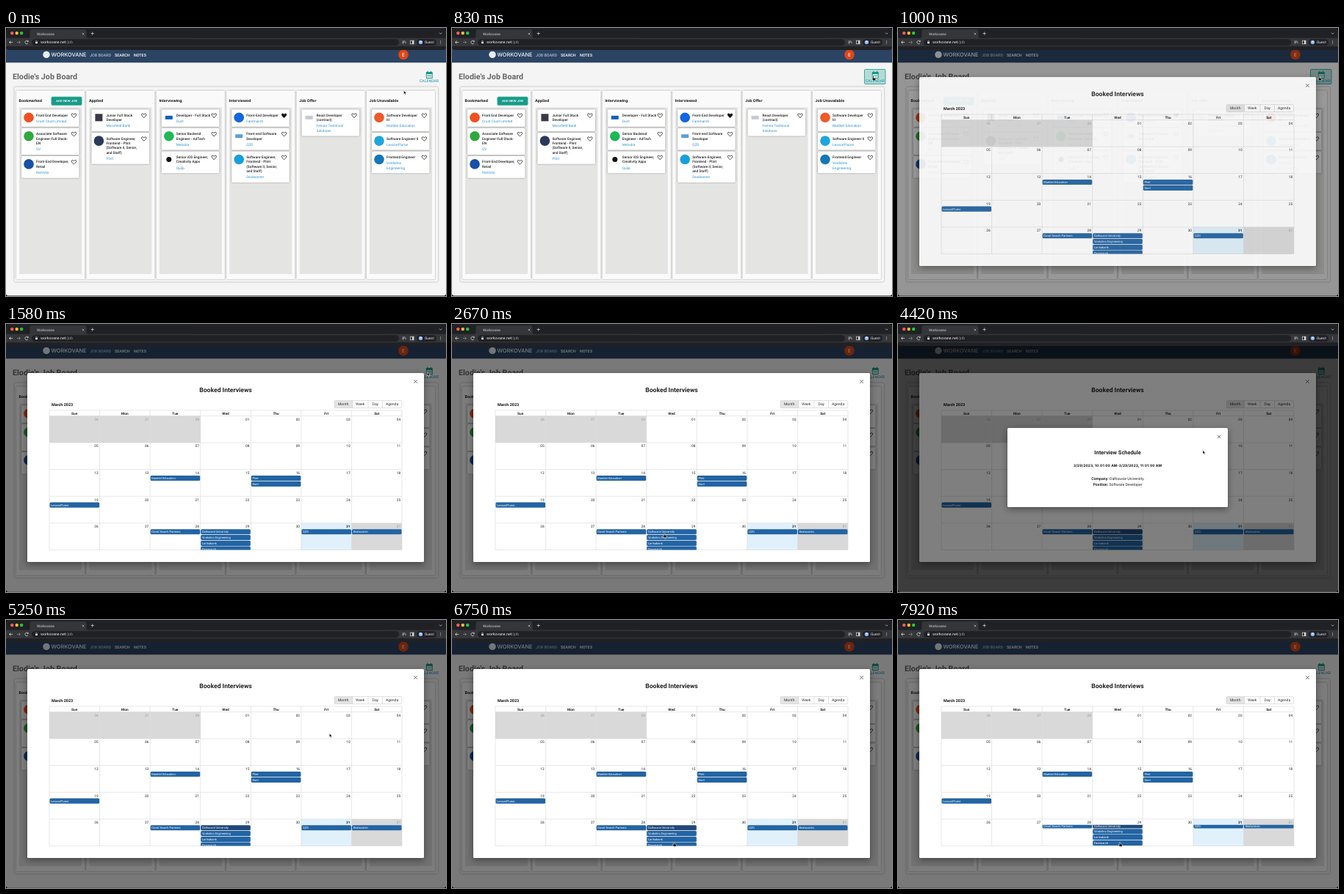
An HTML page for the animation above (8000 ms loop, 599 by 366 pixels).

```html
<!DOCTYPE html>
<html lang="en">
<head>
<meta charset="utf-8">
<title>Job board</title>
<style>
  html, body { margin: 0; width: 100%; height: 100%; overflow: hidden; background: #111; }
  svg { display: block; width: 100%; height: 100%; font-family: Roboto, sans-serif; text-rendering: geometricPrecision; }
  .wide { font-family: Inter, sans-serif; }
  .lift { filter: drop-shadow(0 .6px .8px rgba(0, 0, 0, .35)); }
  .dialog { filter: drop-shadow(0 3px 5px rgba(0, 0, 0, .4)); }
</style>
</head>
<body>
<svg id="stage" viewBox="0 0 599 366"></svg>
<script>
const LOOP = 8000, STEP = 1000 / 12;

// Markup helpers; text is placed by the middle of its capitals.
const rect = (x, y, w, h, fill, more = '') =>
  `<rect x="${x}" y="${y}" width="${w}" height="${h}" fill="${fill}" ${more}/>`;
const circle = (x, y, r, fill) => `<circle cx="${x}" cy="${y}" r="${r}" fill="${fill}"/>`;
const path = (d, stroke, width = .7, more = '') =>
  `<path d="${d}" fill="none" stroke="${stroke}" stroke-width="${width}" ${more}/>`;
const text = (x, y, size, label, fill = '#222', weight = 400, more = '') =>
  `<text x="${x}" y="${y + size * .36}" font-size="${size}" fill="${fill}" font-weight="${weight}" ${more}>${label}</text>`;
const middle = 'text-anchor="middle"';
const cross = (x, y, r, color, width = .8) =>
  path(`M${x - r} ${y - r}l${2 * r} ${2 * r}m0 ${-2 * r}l${-2 * r} ${2 * r}`, color, width);

function browserBar() {
  const light = '#d5d6d8';
  return rect(0, 0, 599, 30, '#202124', 'rx="4"') +
    ['#ff5f57', '#febc2e', '#28c840'].map((c, i) => circle(8.2 + i * 6.5, 7, 2.2, c)).join('') +
    '<path d="M30 14q2.5 0 2.5-2.500v-7q0-2.500 2.500-2.500h72q2.500 0 2.500 2.500v7q0 2.500 2.500 2.500z" fill="#35363a"/>' +
    rect(0, 13.7, 599, 11.5, '#35363a') +
    text(42, 8, 4.8, 'Workovane', light) + cross(105, 8, 1.3, light, .6) +
    path('M115.500 7.500h4.400m-2.200-2.200v4.400', light, .7) +
    path('M590 6.500l1.700 1.700l1.700-1.700', light, .7) +
    path('M9 19.500h-4.500m2-2l-2 2l2 2', light, .8) +
    path('M15 19.500h4.500m-2-2l2 2l-2 2', '#85878a', .8) +
    path('M30 18.300a2.200 2.200 0 1 0 .1 2.200m.1-3.500v1.600h-1.600', light, .8) +
    rect(35, 15.200, 500, 8.800, '#202124', 'rx="4.400"') +
    rect(40, 18.8, 3, 2.4, light) + path('M40.700 19v-1a.8.8 0 0 1 1.600 0v1', light, .5) +
    `<text x="47" y="21.400" font-size="5.300" fill="#eee">workovane.net<tspan fill="#96999d">/job</tspan></text>` +
    path('M539.500 18h4m-4 1.500h3m-3 1.500h2m2.500-2.500v2.500', light, .7) +
    rect(550.5, 17.2, 4.6, 4.6, 'none', `stroke="${light}" stroke-width=".7"`) + rect(553, 17, 2, 4.8, light) +
    rect(559, 15.300, 27, 8.600, '#202124', 'rx="4.300"') + circle(564.5, 19.5, 2.7, '#8ab4f8') +
    circle(564.5, 18.8, .9, '#fff') + text(570, 19.5, 4.9, 'Guest', '#eee') +
    [17.7, 19.5, 21.3].map(y => circle(591.7, y, .5, light)).join('');
}

// Each card: title lines, company lines, colour, mark shape, liked.
const COLUMNS = [
  ['Bookmarked', [
    ['Front End Developer', 'Crust Crust Limited', '#f0501f'],
    ['Associate Software|Engineer-Full Stack-|EN', 'QV', '#2fa83c'],
    ['Front-End Developer,|Retail', 'theVolio', '#1650a8']]],
  ['Applied', [
    ['Junior Full Stack|Developer', 'Mossfield Bank', '#3a3a46', 'square'],
    ['Software Engineer,|Frontend - Plint|(Software II, Senior,|and Staff)', 'Plint', '#2b3a5a']]],
  ['Interviewing', [
    ['Developer - Full Stack', 'Dunt', '#0b62b8', 'flat'],
    ['Senior Backend|Engineer - AdTech', 'Melodra', '#1db954'],
    ['Senior iOS Engineer,|Creativity Apps', 'Quilp', '#111', 'small']]],
  ['Interviewed', [
    ['Front-End Developer', 'Faremarsh', '#1266df', '', true],
    ['Front-end Software|Developer', 'QZD', '#5a9fdc', 'flat'],
    ['Software Engineer,|Frontend - Plint|(Software II, Senior,|and Staff)', 'Dealwarren', '#16a0e0']]],
  ['Job Offer', [
    ['React Developer|(contract)', 'Fennor Technical|Solutions', '#c4cbd0', 'flat']]],
  ['Job Unavailable', [
    ['Software Developer|III', 'Marblet Education', '#ee5a28'],
    ['Software Engineer II', 'LessonPlume', '#1fa5dd'],
    ['Frontend Engineer', 'Vordalino|Engineering', '#1477b6']]],
];

function mark(x, y, color, shape) {
  if (shape === 'flat') return rect(x - 5, y - 2.5, 10, 5, color);
  if (shape === 'square') return rect(x - 5, y - 5, 10, 10, color);
  return circle(x, y, shape === 'small' ? 3.5 : 6.8, color);
}

function card(x, y, [title, company, color, shape, liked]) {
  let at = y, words = '';
  title.split('|').forEach((line, i) => {
    at = y + i * 6.4;
    words += text(x + 27, at, 4.8, line, '#222', 500);
  });
  at += 8.2;
  company.split('|').forEach((line, i) => {
    at += i * 6.4;
    words += text(x + 27, at, 4.8, line, '#2a93d1');
  });
  const heart = path(`M${x + 78.4} ${y + 3.4}c-5.500-4-2.800-7.200 0-4.300c2.800-2.900 5.500 .3 0 4.300z`,
    '#111', .8, liked ? 'style="fill:#111"' : '');
  const body = rect(x + 7, y - 7.7, 78.5, at - y + 15.2, '#fff', 'rx="1.500" class="lift"');
  return [body + mark(x + 17, y + 3.3, color, shape) + words + heart, at + 17.2];
}

function column([name, cards], i) {
  const x = 14 + i * 95.4;
  let y = 119, out = rect(x, 85.5, 93, 257.5, '#fafafa', 'class="lift"') +
    rect(x + 4, 108.5, 85, 227.5, '#e4e4e3') + text(x + 3.6, 99, 5.1, name, '#111', 700, 'class="wide"');
  for (const data of cards) {
    const [markup, next] = card(x, y, data);
    out += markup;
    y = next;
  }
  return out;
}

function page() {
  return rect(0, 25, 599, 340.5, '#f4f4f4', 'rx="3"') + rect(0, 25, 599, 22.3, '#2c4463') +
    circle(55, 36.4, 4.7, '#e8edf2') + text(61.5, 36.6, 7.4, 'WORKOVANE', '#f0f3f6', 500, 'class="wide"') +
    text(114, 36.6, 5.4, 'JOB BOARD', '#a9bccf', 500) + text(148, 36.6, 5.4, 'SEARCH', '#fff', 500) +
    text(174, 36.6, 5.4, 'NOTES', '#fff', 500) +
    circle(541, 36.4, 6.8, '#dd4719') + text(541, 36.4, 7, 'E', '#fff', 400, middle) +
    text(9, 66.5, 10.7, 'Elodie\'s Job Board', '#666', 700) +
    rect(561.5, 56.5, 28.5, 20, '#179a8b', 'id="hover" fill-opacity=".28" stroke="#179a8b" stroke-width=".8" rx="1"') +
    rect(571.8, 60, 9, 9, '#149888', 'rx="1"') + rect(572.8, 63, 7, 5, '#f4f4f4') +
    rect(573.5, 58.8, 1.1, 2, '#149888') + rect(578, 58.8, 1.1, 2, '#149888') +
    [574, 576, 578].map(x => rect(x - .1, 64, .9, 2.6, '#149888')).join('') +
    text(576, 72.4, 5.2, 'CALENDAR', '#1b8fae', 400, middle) +
    rect(11.5, 80.5, 576.5, 266, '#f6f6f6', 'rx="2" class="lift"') +
    COLUMNS.map(column).join('') +
    rect(61.8, 94, 41.4, 11.5, '#159b87', 'rx="1.500" stroke="#5cbcae" stroke-width=".8"') +
    text(82.5, 99.8, 4.1, 'ADD NEW JOB', '#fff', 600, middle + ' class="wide"');
}

const GRID = { x: 59, y: 125.5, w: 480 / 7, h: 36.6 };
// Events: column, row, slot in the day, label, id.
const EVENTS = [
  [2, 2, 0, 'Marblet Education'], [4, 2, 0, 'Plint'], [4, 2, 1, 'Dunt'], [0, 3, 0, 'LessonPlume'],
  [2, 4, 0, 'Dovel Search Partners'], [3, 4, 0, 'Dalhousie University', 'picked'],
  [3, 4, 1, 'Vordalino Engineering'], [3, 4, 2, 'Lorinabank'], [3, 4, 3, 'Faremarsh'],
  [5, 4, 0, 'QZD'], [6, 4, 0, 'Dealwarren', 'late'],
];

function event([col, row, slot, label, id]) {
  const x = GRID.x + col * GRID.w, y = GRID.y + row * GRID.h + 8.3 + slot * 7.8;
  return `<g ${id ? `id="${id}"` : ''} fill="#2364a3">` +
    `<rect x="${x + .5}" y="${y}" width="${GRID.w - 1}" height="7.100" rx="1.500"/>` +
    text(x + 2.2, y + 3.6, 4, label, '#fff') + '</g>';
}

function calendar() {
  const { x, y, w, h } = GRID, line = '#d8d8d8';
  let cells = '';
  for (let i = 0; i < 35; i++) {
    const col = i % 7, row = Math.floor(i / 7), off = i < 3 || i === 34, today = i === 33;
    const day = i < 3 ? 26 + i : i === 34 ? 1 : i - 2;
    if (off || today) cells += rect(x + col * w, y + row * h, w, h, off ? '#d9d9d9' : '#e0f1fc');
    cells += text(x + (col + 1) * w - 1.8, y + row * h + 4.6, 4.8, String(day).padStart(2, '0'),
      off ? '#999' : '#222', today ? 700 : 400, 'text-anchor="end"');
  }
  let lines = '';
  for (let i = 1; i < 7; i++) lines += `M${x + i * w} 118v${y + 5 * h - 118}`;
  for (let i = 0; i < 5; i++) lines += `M${x} ${y + i * h}h480`;
  const days = ['Sun', 'Mon', 'Tue', 'Wed', 'Thu', 'Fri', 'Sat']
    .map((d, i) => text(x + (i + .5) * w, 121.8, 4.8, d, '#222', 700, middle)).join('');
  const views = [['Month', 459.2], ['Week', 482.2], ['Day', 502.8], ['Agenda', 525.6]]
    .map(([v, cx]) => text(cx, 109.6, 5.1, v, '#333', 400, middle)).join('');
  return rect(29, 67, 540, 258, '#fff', 'rx="1.500" class="dialog"') +
    text(299, 89.7, 8.6, 'Booked Interviews', '#222', 700, middle) + cross(557.5, 78.5, 2.2, '#444') +
    text(62, 109.6, 5.4, 'March 2023', '#111', 700) +
    rect(447.2, 104.6, 24.3, 10, '#e4e4e4') +
    rect(447.2, 104.6, 91.5, 10, 'none', 'rx="1.500" stroke="#ccc" stroke-width=".6"') +
    path('M471.500 104.600v10m21.500-10v10m19.500-10v10', '#ccc', .6) + views +
    cells + path(lines, line, .6) +
    rect(x, 118, 480, y + 5 * h - 118, 'none', `stroke="${line}" stroke-width=".6"`) + days +
    EVENTS.filter(e => e[1] < 4).map(event).join('') +
    `<clipPath id="week">${rect(x, 279.8, 480, 28.7, '#000')}</clipPath>` +
    `<g clip-path="url(#week)"><g id="scroll">${EVENTS.filter(e => e[1] === 4).map(event).join('')}</g></g>`;
}

function details() {
  const row = (y, key, value) =>
    text(299, y, 5.2, `<tspan font-weight="700">${key}:</tspan> ${value}`, '#222', 400, middle);
  return rect(149, 142, 300, 108, '#fff', 'rx="1.500" class="dialog"') +
    text(299, 175, 7.4, 'Interview Schedule', '#222', 700, middle) + cross(437.2, 154, 2.2, '#444') +
    text(299, 193.2, 4.8, '3/29/2023, 10:01:00 AM-3/29/2023, 11:01:00 AM', '#111', 700,
      middle + ' class="wide" letter-spacing=".1"') +
    row(211, 'Company', 'Dalhousie University') + row(219, 'Position', 'Software Developer');
}

const shade = id => rect(0, 25, 599, 340.5, '#000', `id="${id}"`);
const stage = document.getElementById('stage');
stage.innerHTML = page() + shade('shade1') + `<g id="calendar">${calendar()}</g>` +
  shade('shade2') + `<g id="details">${details()}</g>` + browserBar() +
  `<g id="cursor" stroke="#fff" stroke-width=".5" fill="#000" stroke-linejoin="round">
    <path id="arrow" d="M0 0v5l1.200-1.100l.9 1.900l.9-.4l-.9-1.800h1.600z"/>
    <path id="hand" d="M-.6 .5q0-.8.6-.8t.6.800v1.700l2.200.5q.6.200.5.900l-.4 2.200h-3l-1.700-2.300q-.2-.8.5-.6l.7.500z"/>
  </g>`;
const $ = id => document.getElementById(id);

const clamp = v => Math.min(1, Math.max(0, v));
const smooth = p => p * p * (3 - 2 * p);
const between = (t, a, b) => t >= a && t < b;

// Pointer stops: time, x, y.
const POINTER = [
  [0, 541.5, 85.5], [150, 541.5, 85.5], [680, 573.5, 66], [1750, 573.5, 66], [2420, 289, 286],
  [4170, 289, 286], [4420, 415, 172.5], [4650, 436.5, 153], [5050, 436.5, 153], [5250, 440.3, 155],
  [5920, 440.3, 155], [6650, 302, 303.5], [LOOP, 302, 303.5],
];

function pointerAt(t) {
  const i = POINTER.findIndex(p => p[0] > t), [t0, x0, y0] = POINTER[i - 1], [t1, x1, y1] = POINTER[i];
  const p = smooth((t - t0) / (t1 - t0));
  return [x0 + (x1 - x0) * p, y0 + (y1 - y0) * p];
}

function setFade(shadeId, dialogId, p) {
  $(shadeId).setAttribute('opacity', .5 * p);
  $(dialogId).setAttribute('opacity', clamp(p * 1.15));
}

function render(t) {
  const open = start => smooth(clamp((t - start) / 200));
  setFade('shade1', 'calendar', open(860));
  setFade('shade2', 'details', open(3110) * (1 - open(5040)));
  const show = (id, on) => $(id).setAttribute('visibility', on ? 'visible' : 'hidden');
  show('hover', between(t, 560, 1160));
  show('late', t >= 1080);
  $('picked').setAttribute('fill', t >= 3080 ? '#20497a' : '#2364a3');
  $('scroll').setAttribute('transform', `translate(0 ${-2.7 * smooth(clamp((t - 6900) / 400))})`);
  const [x, y] = pointerAt(t);
  $('cursor').setAttribute('transform', `translate(${x} ${y})`);
  const hand = between(t, 560, 1160) || between(t, 2320, 4200) || between(t, 4560, 5080) || t >= 6550;
  show('hand', hand);
  show('arrow', !hand);
}

const start = performance.now();
function tick(now) {
  const t = Math.max(0, now - start) % LOOP;
  render(Math.min(95, Math.floor((t + 4) / STEP)) * STEP);
  requestAnimationFrame(tick);
}
render(0);
requestAnimationFrame(tick);
</script>
</body>
</html>
```
